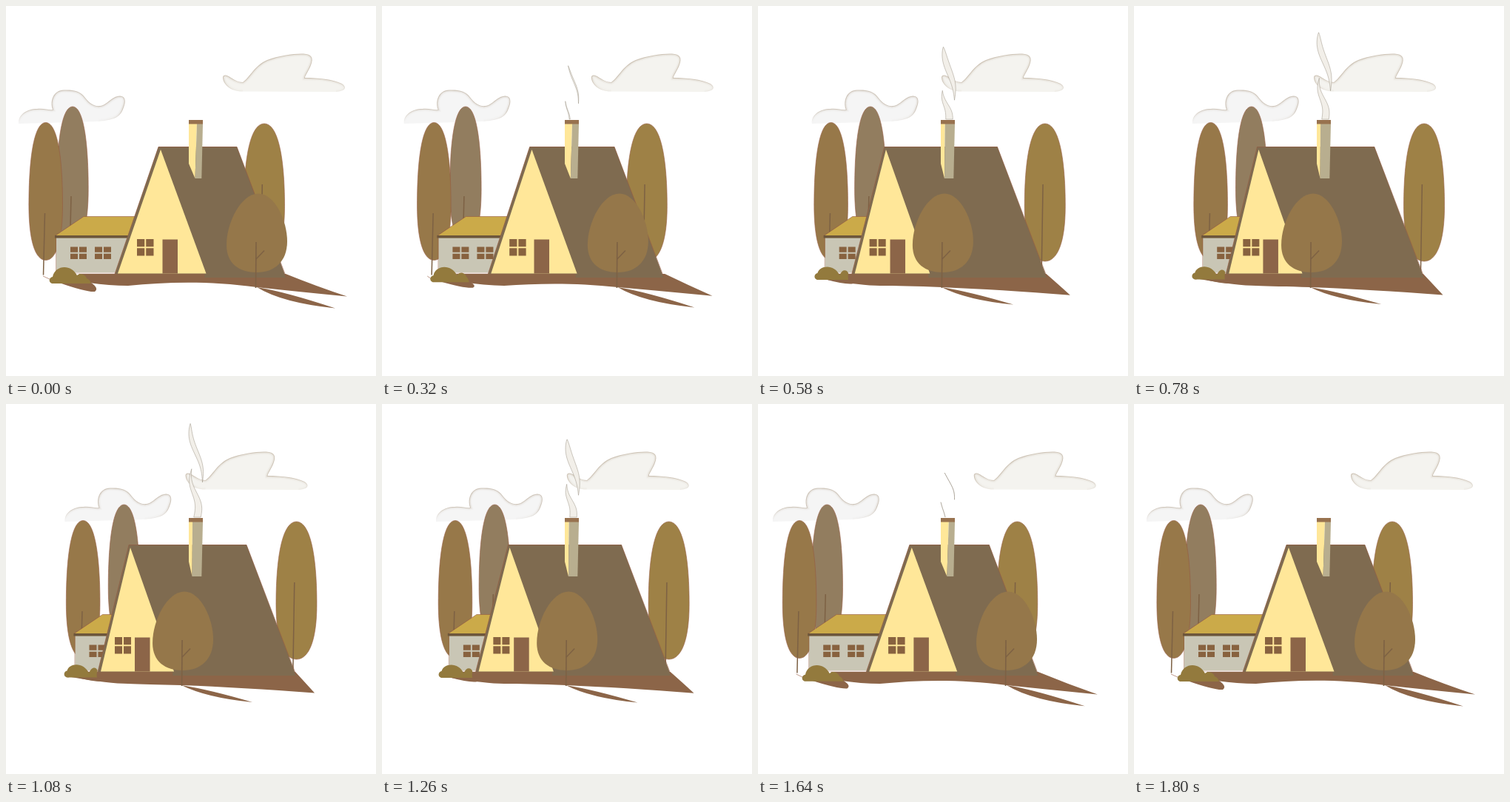
These frames come from a looping animation (500x500 px, 2100 ms). An HTML page with a canvas:

```html
<!DOCTYPE html>
<html lang="en">
<head>
<meta charset="utf-8">
<title>House turning</title>
<style>
  html, body { margin: 0; width: 100%; height: 100%; overflow: hidden; background: #fff; }
  canvas { display: block; width: 100%; height: 100%; }
</style>
</head>
<body>
<canvas id="stage" width="500" height="500"></canvas>
<script>
const ctx = document.getElementById('stage').getContext('2d');
const LOOP = 2100, STEP = 20, OUT_END = 900, BACK_START = 1060, BACK_END = 1800;

const COL = {
  earth: '#8c6548', roof: '#7f6b50', front: '#ffe799', pane: '#88623f',
  wall: '#c9c6b5', shedRoof: '#cbaa49', eave: '#6d563b', stone: '#b8ae8f',
  cap: '#98724f', treeA: '#977849', treeB: '#927d5f', treeC: '#9e8146',
  shrub: '#95774a', bush: '#937a3d', twig: '#7d6144', rim: 'rgba(150,90,65,.6)',
  smoke: '#f2efe9', smokeRim: 'rgba(135,125,110,.6)'
};

// Bezier handles (a,0) and (b,1) for turning out and back
const EASES = {
  house: { out: [.73, .21], back: [.62, .18] },
  near:  { out: [.68, .19], back: [.62, .18] },
  left:  { out: [.54, .23], back: [.6, .34] },
  skyL:  { out: [.68, .19], back: [.6, .34] },
  skyR:  { out: [.68, .19], back: [.58, .12] }
};

const mix = (a, b, p) => a + (b - a) * p;
const clamp = x => Math.max(0, Math.min(1, x));
const sin = turns => Math.sin(turns * Math.PI);

function ease(x, [a, b]) {
  let lo = 0, hi = 1;
  for (let i = 0; i < 24; i++) {
    const s = (lo + hi) / 2, r = 1 - s;
    if (3 * a * s * r * r + 3 * b * s * s * r + s * s * s < x) lo = s; else hi = s;
  }
  return lo * lo * (3 - 2 * lo);
}

const outward = t => clamp(t / OUT_END);
const backward = t => clamp((t - BACK_START) / (BACK_END - BACK_START));
const linear = t => outward(t) - backward(t);
const turn = (t, { out, back }) => ease(outward(t), out) - ease(backward(t), back);

function trace(pts) {
  ctx.beginPath();
  for (let i = 0; i < pts.length; i += 2) ctx.lineTo(pts[i], pts[i + 1]);
}

function poly(color, ...pts) {
  trace(pts);
  ctx.fillStyle = color;
  ctx.fill();
}

function line(color, width, ...pts) {
  trace(pts);
  ctx.strokeStyle = color;
  ctx.lineWidth = width;
  ctx.stroke();
}

function rect(color, x, y, w, h) {
  ctx.fillStyle = color;
  ctx.fillRect(x, y, w, h);
}

function shifted(dx, draw) {
  ctx.save();
  ctx.translate(dx, 0);
  draw();
  ctx.restore();
}

function tallTree(color, x, top, r, trunkX, trunkTop) {
  const bottom = top + 186, wide = mix(top, bottom, .6);
  ctx.beginPath();
  ctx.moveTo(x, bottom);
  for (const [side, from, to] of [[-1, bottom, top], [1, top, bottom]]) {
    const edge = x + side * r, soft = x + side * r * .64;
    ctx.bezierCurveTo(soft, from, edge, mix(wide, from, .63), edge, wide);
    ctx.bezierCurveTo(edge, mix(wide, to, .63), soft, to, x, to);
  }
  ctx.fillStyle = color;
  ctx.fill();
  ctx.strokeStyle = COL.rim;
  ctx.lineWidth = 1;
  ctx.stroke();
  line(COL.twig, 1.5, trunkX, trunkTop, trunkX - 2, top + 206);
}

const CLOUD_L = new Path2D('M17 159C16 147 28 139 42 139C52 138 58 141 63 140C59 128 64 114 78 113.5' +
  'C92 113 101 115 107 124C113 132 120 136 127 135C137 134 142 122 154 121.5' +
  'C162 121.5 162 130 159 137C155 150 147 154 125 156');
const CLOUD_R = new Path2D('M320 115.5C304 116 293 106 293 96C294 92 299 93 304 97C309 100 314 103 320 103' +
  'C330 96 336 80 353 73C369 67 389 64 402 64.5C413 65 416 70 412 80C409 88 404 94 404 97' +
  'C421 97 442 99 454 105C461 110 459 115 446 116');

// Soft inner rim that fades out towards the flat bottom
function cloud(color, shape, bottom) {
  ctx.save();
  ctx.fillStyle = color;
  ctx.fill(shape);
  ctx.clip(shape);
  for (const [width, alpha] of [[7, .04], [4.5, .08], [2, .28]]) {
    const fade = ctx.createLinearGradient(0, bottom - 18, 0, bottom);
    fade.addColorStop(0, `rgba(140,115,85,${alpha})`);
    fade.addColorStop(1, 'rgba(140,115,85,0)');
    ctx.strokeStyle = fade;
    ctx.lineWidth = width;
    ctx.stroke(shape);
  }
  ctx.restore();
}

function windowPanes(x, y, w, h) {
  const pw = w / 2 - 1, ph = h / 2 - 1;
  for (const i of [0, 1]) for (const j of [0, 1])
    rect(COL.pane, x + i * (pw + 2), y + j * (ph + 2), pw, ph);
}

function shed() {
  rect(COL.wall, 68, 313, 100, 47);
  line(COL.rim, .8, 67.5, 314, 67.5, 361, 150, 361);
  poly(COL.shedRoof, 66, 311, 105, 284.5, 180, 284.5, 180, 311);
  line(COL.rim, 1, 66, 310.5, 105, 284.5, 178, 284.5);
  rect(COL.eave, 66, 310, 110, 3.6);
  for (const x of [87, 120]) windowPanes(x, 325.5, 22, 16.5);
}

function ground(l, h) {
  const m = (a, b) => mix(a, b, l);
  const x = mix(339, 237, h), corner = m(378, 391), tipX = m(461, 417), tipY = m(392.5, 390.5);
  ctx.fillStyle = COL.earth;
  ctx.beginPath();
  ctx.moveTo(m(98, 104), 362);
  ctx.lineTo(corner, 362);
  ctx.quadraticCurveTo(m(420, 402), m(379, 374), tipX, tipY);
  ctx.quadraticCurveTo(mix(x, tipX, .45), m(386, 383), x, 380);
  ctx.bezierCurveTo(mix(x, 150, .35), m(371, 379), mix(x, 150, .65), m(373, 379), 165, 378);
  ctx.quadraticCurveTo(140, 378, m(112, 88), m(374, 369));
  ctx.fill();

  ctx.beginPath();
  ctx.moveTo(x, 380);
  ctx.quadraticCurveTo(x + 38, 386, mix(445, 333, h), mix(408.5, 403, h));
  ctx.quadraticCurveTo(x + 34, mix(401, 397, h), x, 380);
  ctx.fill();
}

function bush(p) {
  const x = mix(58, 78, p), end = mix(115, 123, p), low = mix(375, 369.5, p);
  const s = mix(1, .9, p), rise = 7 * p, depth = mix(11, 5, Math.sqrt(p));
  ctx.fillStyle = COL.earth;
  ctx.beginPath();
  ctx.moveTo(x + 14, low - 1);
  ctx.lineTo(end, low - 1);
  ctx.quadraticCurveTo(end + 11, low + depth * .6, end + 5, low + depth);
  ctx.quadraticCurveTo(end - 6, low + depth + 1, x + 14, low - 1);
  ctx.fill();

  ctx.fillStyle = COL.bush;
  ctx.beginPath();
  ctx.moveTo(x + 4, low);
  ctx.bezierCurveTo(x - 1, low - 2, x, low - 8, x + 5 * s, low - 9);
  ctx.bezierCurveTo(x + 8 * s, 350, x + 30 * s, 348, x + 38 * s, 364);
  ctx.bezierCurveTo(x + 42 * s, 360 - rise, x + 50 * s, 363 - rise, x + 51 * s, 368 - rise);
  ctx.quadraticCurveTo(end - 1, 370 - rise, end, low);
  ctx.fill();
}

function house(p) {
  const m = (a, b) => mix(a, b, p);
  const ridgeL = m(206, 166), ridgeR = m(312, 325), footL = m(147, 124), footR = m(378.5, 392);
  const frontR = m(270.5, 227);
  poly(COL.roof, ridgeL, 190, ridgeR, 190, footR, 367, frontR - 2, 367, frontR - 2, 362, footL, 362);
  line(COL.rim, 1, footL, 362, ridgeL, 190.5, ridgeR, 190.5, footR, 366);
  poly(COL.front, m(209, 168), 194, frontR, 361.5, footL + 4, 361.5);
  windowPanes(m(177, 147), 315, m(22.5, 22), 22.5);
  rect(COL.earth, m(211.5, 174), 315.5, 20.5, 46);

  const splitTop = m(258, 252), splitLow = m(255.5, 251.5);
  poly(COL.front, 247, 159, splitTop, 159, splitLow, 233, 247, 213);
  poly(COL.stone, splitTop, 159, 266, 159, 264.3, 233, splitLow, 233);
  rect(COL.cap, 247, 154, 19, 5.5);
}

const SHRUB = new Path2D('M341 253.5C363 253.5 380 290 380 318C380 346 362 360 339 360' +
  'C315 360 298 348 298 323C298 292 318 253.5 341 253.5Z');

function shrub() {
  ctx.fillStyle = COL.shrub;
  ctx.fill(SHRUB);
  line(COL.twig, 1.6, 338, 319, 337.5, 381);
  line(COL.twig, 1.4, 338, 342, 349, 330.5);
}

// Wavy ribbon from tip to foot; girth(u) is its width along the way
function plume(tipX, tipY, footX, footY, bend, wave, girth) {
  const N = 28, left = [], right = [];
  for (let i = 0; i <= N; i++) {
    const u = i / N, y = mix(tipY, footY, u);
    const x = mix(tipX, footX, u) + bend * sin(u) - wave * sin(2 * u);
    const half = girth(u) / 2;
    left.push(x - half, y);
    right.unshift(x + half, y);
  }
  // right was built as y,x pairs from the front, so restore the order
  const pts = [...left];
  for (let i = 0; i < right.length; i += 2) pts.push(right[i], right[i + 1]);
  poly(COL.smoke, ...pts);
  line(COL.smokeRim, .7, ...pts);
}

function smoke(v) {
  if (v < .1) return;
  const puff = 9 * sin(clamp((v - .3) / .9));
  plume(253 - 4 * v, mix(112, 24, v), 265.5, 132 - 80 * (v - .4) ** 2, 4 * (1 - v), 3 * v,
    u => puff * sin(u ** .75));
  const grow = clamp((v - .32) / .28);
  plume(246 + 5 * v, 135 - 50 * v * v, mix(253, 258.5, grow), 153, 0, 3.5 * v * v,
    u => 9.5 * grow * sin(u / 2));
}

function draw(t) {
  const pose = {};
  for (const name in EASES) pose[name] = turn(t, EASES[name]);
  const { house: h, near, left, skyL, skyR } = pose;
  rect('#fff', 0, 0, 500, 500);

  shifted(62.5 * skyL, () => cloud('#f5f5f5', CLOUD_L, 157));
  shifted(-50.5 * skyR, () => cloud('#f4f3ef', CLOUD_R, 118));
  smoke(linear(t));

  shifted(43.5 * near, () => tallTree(COL.treeC, 349, 159, 27.5, 346.3, 241));
  shifted(69.5 * left, () => tallTree(COL.treeB, 90, 136, 21.2, 88, 257));
  shifted(50.5 * left, () => tallTree(COL.treeA, 53.7, 157.5, 22.8, 52.5, 280));
  line(COL.rim, 1, mix(50, 84, left), 365, mix(61, 84, left), 370);

  ground(left, near);
  shifted(25.5 * left, shed);
  house(h);
  bush(left);
  shifted(-100 * near, shrub);
}

const start = performance.now();
function tick() {
  const t = (performance.now() - start) % LOOP;
  draw(Math.floor(t / STEP) * STEP);
  requestAnimationFrame(tick);
}
tick();
</script>
</body>
</html>
```
